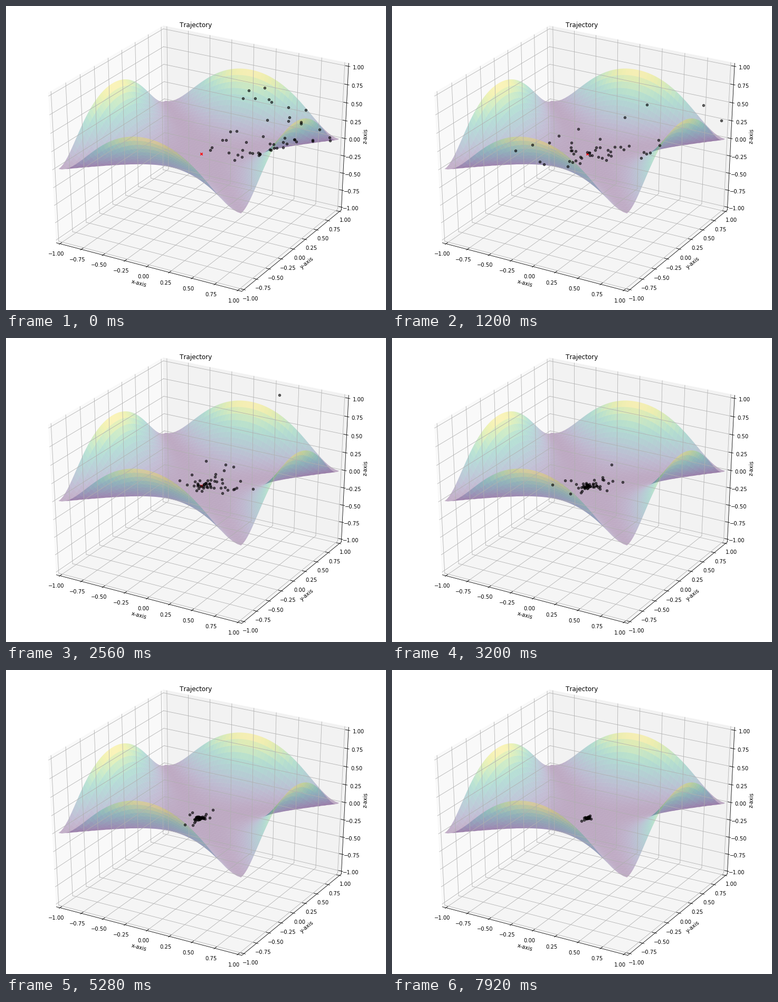
A matplotlib script for the animation above (8 s loop, 720x576 px).

```python
import numpy as np
import matplotlib.pyplot as plt
from matplotlib.animation import FuncAnimation
from matplotlib.collections import LineCollection, PolyCollection

W, H, FRAMES, INTERVAL = 720, 576, 100, 80
PANES = ["#f9f9f9", "#f2f2f2", "#f5f5f5"]
GRID = "#b0b0b0"
plt.rcParams["font.family"] = "DejaVu Sans"
plt.rcParams["text.kerning_factor"] = 6

# Camera at azimuth -60, elevation 30, ten cube widths away.
AZIM, ELEV, DIST = np.radians(-60), np.radians(30), 10
RIGHT = np.array([-np.sin(AZIM), np.cos(AZIM), 0])
UP = np.array([-np.sin(ELEV) * np.cos(AZIM), -np.sin(ELEV) * np.sin(AZIM), np.cos(ELEV)])
TOWARD = np.cross(RIGHT, UP)


def project(points):
    """Map points of the cube [-1, 1]^3 to stage pixels."""
    p = np.asarray(points, float) / 2
    scale = DIST / (DIST - p @ TOWARD)
    x = (0.95 + p @ RIGHT * scale) / 1.85 * W
    y = H - (0.95 + p @ UP * scale) / 1.85 * H
    return np.stack([x, y], axis=-1)


def schaffer(x, y):
    num = np.sin(x**2 - y**2) ** 2 - 0.5
    return 0.5 + num / (1 + 0.001 * (x**2 + y**2)) ** 2


def on_surface(x, y):
    return np.stack([x, y, schaffer(x, y)], axis=-1)


fig = plt.figure(figsize=(W / 72, H / 72), dpi=72, facecolor="white")
ax = fig.add_axes([0, 0, 1, 1])
ax.set(xlim=(0, W), ylim=(H, 0))
ax.axis("off")

EDGE = 1 + 1 / 24      # panes reach slightly past the limits
STEP = 1 / 6           # one twelfth of the axis range
PER_POINT = 48 / 1296
TICK_PAD = 11.5 * PER_POINT * STEP
LABEL_PAD = 25 * PER_POINT * STEP
BACK = np.array([-EDGE, EDGE, -EDGE])
TICKS = np.linspace(-1, 1, 9)


def moved(point, **coords):
    out = np.array(point, float)
    for key, value in coords.items():
        out["xyz".index(key)] = value
    return out


def draw_lines(segments, color):
    ax.add_collection(LineCollection(project(segments), colors=color, linewidths=0.8,
                                     capstyle="projecting"))


def draw_panes():
    for i, color in enumerate(PANES):
        a, b = (i + 1) % 3, (i + 2) % 3
        quad = np.tile(BACK, (4, 1))
        quad[1:3, a] *= -1
        quad[2:4, b] *= -1
        ax.add_patch(plt.Polygon(project(quad), fc=color, ec=color, lw=1))
    segments = []
    for i in range(3):
        for t in TICKS:
            start = BACK.copy()
            start[i] = t
            for j in range(3):
                if j != i:
                    end = start.copy()
                    end[j] *= -1
                    segments.append([start, end])
    draw_lines(segments, GRID)


def draw_axis(name, corner, tick_axis):
    """Draw one axis line through corner with ticks, numbers and label."""
    i, j = "xyz".index(name), "xyz".index(tick_axis)
    outward = np.sign(corner)
    outward[i] = 0
    ends = [moved(corner, **{name: -EDGE}), moved(corner, **{name: EDGE})]
    draw_lines([ends], "black")
    marks = []
    for t in TICKS:
        base = moved(corner, **{name: t})
        inner, outer = base.copy(), base.copy()
        inner[j] -= 0.2 * STEP * outward[j]
        outer[j] += 0.1 * STEP * outward[j]
        marks.append([inner, outer])
        x, y = project(base + outward * TICK_PAD)
        ax.text(x, y, f"{t:.2f}".replace("-", "\u2212"), size=10, ha="center", va="top")
    draw_lines(marks, "black")
    (x0, y0), (x1, y1) = project(ends)
    angle = np.degrees(np.arctan2(y0 - y1, x1 - x0))
    x, y = project(moved(corner, **{name: 0}) + outward * LABEL_PAD)
    ax.text(x, y, f"{name}-axis", size=10, ha="center", va="center",
            rotation=angle, rotation_mode="anchor")


def draw_surface():
    n = 50
    line = np.append(-1 + np.arange(n) * 0.04, 0.999)
    pts = on_surface(*np.meshgrid(line, line))
    quads = np.stack([pts[:-1, :-1], pts[:-1, 1:], pts[1:, 1:], pts[1:, :-1]], axis=2)
    quads = quads.reshape(-1, 4, 3)
    quads = quads[np.argsort((quads @ TOWARD).mean(axis=1))]
    mesh = PolyCollection(project(quads), cmap="viridis", alpha=0.3, linewidths=0,
                          edgecolors="none")
    mesh.set_array(quads[:, :, 2].mean(axis=1))
    ax.add_collection(mesh)


def swarm_paths(count=50, inertia=0.9, own=0.5, social=0.3):
    """Particle swarm search: stage positions for every frame."""
    rng = np.random.default_rng(7)
    pos = rng.random((count, 2))
    vel = rng.random(pos.shape)
    best, best_cost = pos.copy(), schaffer(*pos.T)
    paths = []
    for _ in range(FRAMES):
        paths.append(project(on_surface(*pos.T)))
        cost = schaffer(*pos.T)
        better = cost < best_cost
        best[better], best_cost[better] = pos[better], cost[better]
        leader = best[np.argmin(best_cost)]
        vel = (inertia * vel + own * rng.random(pos.shape) * (best - pos)
               + social * rng.random(pos.shape) * (leader - pos))
        pos = pos + vel
    return paths


draw_panes()
draw_axis("x", [0, -EDGE, -EDGE], "y")
draw_axis("y", [EDGE, 0, -EDGE], "x")
draw_axis("z", [EDGE, EDGE, 0], "x")
draw_surface()
ax.text(W / 2, 0.08 * H - 6, "Trajectory", size=12, ha="center", va="baseline")
ax.scatter(*project([0, 0, 0]), s=20, c="red", marker="x", linewidths=1.5, zorder=4)

paths = swarm_paths()
dots = ax.scatter(*paths[0].T, s=20, c="black", alpha=0.6, zorder=5)


def update(frame):
    dots.set_offsets(paths[frame])
    return (dots,)


anim = FuncAnimation(fig, update, frames=FRAMES, interval=INTERVAL, repeat=True, repeat_delay=0)
plt.show()
```
